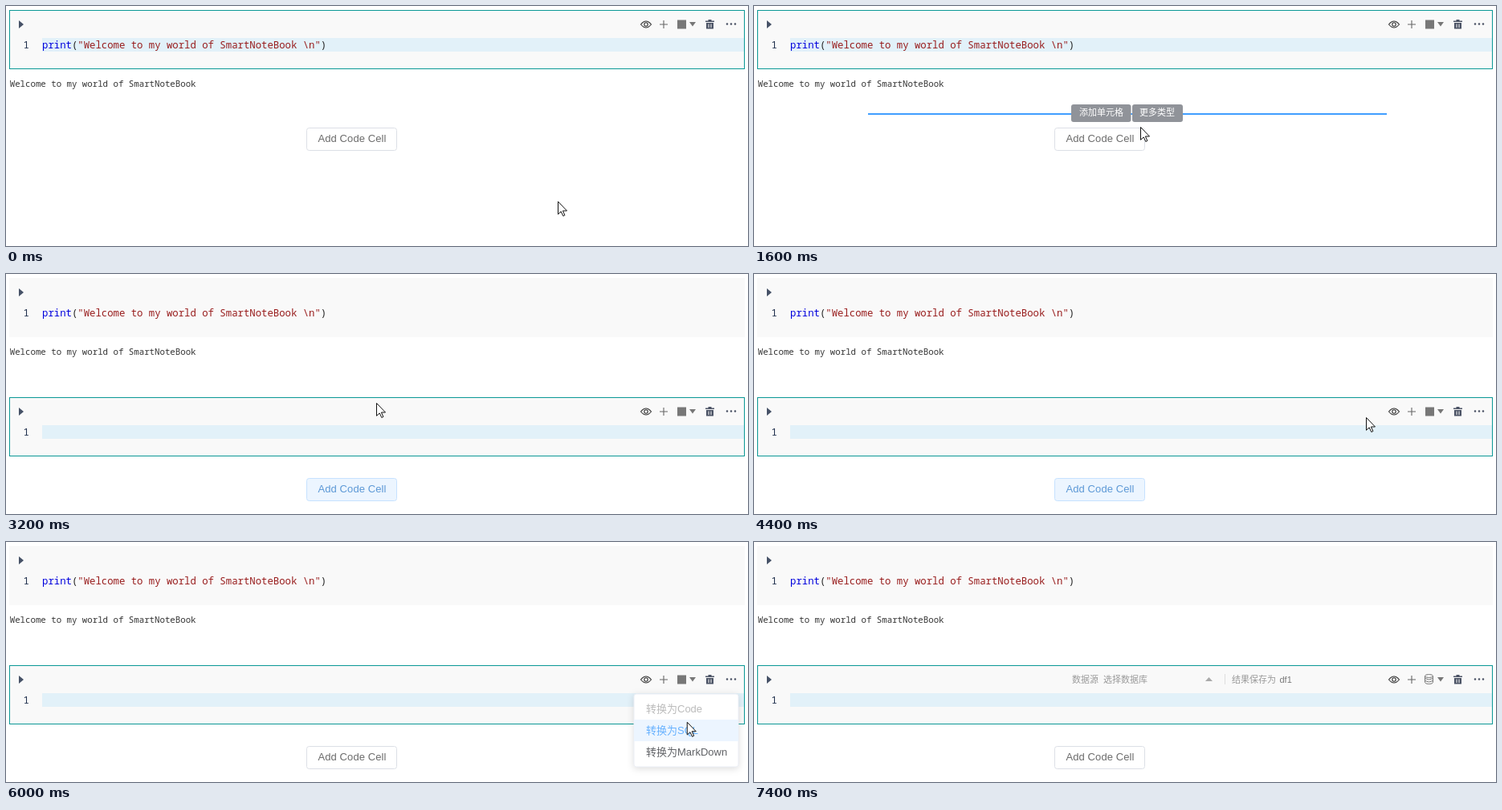
An HTML page for the animation above (8.2 s loop, 924 px wide and 300 px high).

```html
<!DOCTYPE html>
<html lang="zh">
<head>
<meta charset="utf-8">
<title>Notebook cells</title>
<style>
  html, body { margin: 0; width: 100%; height: 100%; overflow: hidden; background: #fff; }
  svg { display: block; width: 924px; height: 300px; }
  text { white-space: pre; }
  .code { font: 12.3px "Noto Sans Mono", monospace; fill: #222; }
  .out { font: 10.74px "Noto Sans Mono", monospace; fill: #333; }
  .word { fill: #00d; }
  .str { fill: #981c1c; }
  .num { fill: #1f2f4c; }
  .ui { font: 11px "Liberation Sans", "Noto Sans CJK SC", "Noto Sans CJK", sans-serif; fill: #999; }
  .light { fill: #fff; font-weight: 500; }
  .item { font-size: 13px; fill: #606266; }
  .item.off { fill: #bbb; }
  .item.hover { fill: #66b1ff; }
  .cell { fill: #f9f9f9; }
  .play { fill: #465267; }
  #add rect { fill: #fff; stroke: #dcdfe6; }
  #add text { font: 13px "Liberation Sans", Arial, sans-serif; letter-spacing: .1px; fill: #6b6b6b; }
  #add.hover rect, #add.press rect { fill: #ecf5ff; stroke: #c6e2ff; }
  #add.press rect { stroke: #5a9fdc; }
  #add.hover text, #add.press text { fill: #5c98d6; }
  #type { color: #777; }
  #type.on { color: #1b95d3; }
  .dark { fill: #303133; }
  .panel { fill: #fff; stroke: #ebeef5; filter: drop-shadow(0 2px 4px #0002); }
</style>
</head>
<body>
<svg viewBox="0 0 924 300">
  <rect class="cell" x="4" y="5" width="916" height="74"/>
  <rect class="cell" id="cell2" x="4" y="154" width="916" height="74"/>

  <g id="active">
    <rect x="4.5" y="5.5" width="915" height="73" fill="none" stroke="#0a9896"/>
    <rect x="45" y="40" width="874" height="17" fill="#e2f1f9"/>
    <g fill="none" stroke="#333" stroke-width="1.1">
      <path d="M790.5 23Q797 15 803.5 23Q797 31 790.5 23Z"/>
      <circle cx="797" cy="23" r="2.2"/>
      <path d="M814 23H824M819 18V28" stroke="#666"/>
    </g>
    <g id="type">
      <rect id="lang" x="836" y="17.5" width="11" height="11" fill="currentColor"/>
      <g id="db" fill="none" stroke="currentColor">
        <ellipse cx="840.5" cy="18.5" rx="5" ry="2"/>
        <path d="M835.5 18.5V26.5Q836 28.5 840.5 28.5T845.5 26.5V18.5M835.5 21.5Q840.5 24.5 845.5 21.5M835.5 24.5Q840.5 27.5 845.5 24.5"/>
      </g>
      <path d="M851 20H859L855 25.5Z" fill="currentColor"/>
    </g>
    <g fill="#4b5365">
      <path d="M871 18.5H874.5V17H878.5V18.5H882V20H871ZM872 21H881V28.5H872Z"/>
      <path d="M875 22.5V27M878 22.5V27" stroke="#f9f9f9"/>
      <path d="M898 22.5h0m5 0h0m5 0h0" stroke="#4b5365" stroke-width="2.6" stroke-linecap="round"/>
    </g>
  </g>

  <path class="play" d="M16 18V28L22 23Z"/>
  <text class="code num" x="21.5" y="53">1</text>
  <text class="code" x="45" y="53"><tspan class="word">print</tspan>(<tspan class="str">"Welcome to my world of SmartNoteBook \n"</tspan>)</text>
  <text class="out" x="4.7" y="101">Welcome to my world of SmartNoteBook</text>

  <g id="label2" transform="translate(0 149)">
    <path class="play" d="M16 18V28L22 23Z"/>
    <text class="code num" x="21.5" y="53">1</text>
  </g>

  <g id="sql" class="ui">
    <text x="396" y="175.5">数据源</text>
    <text x="435" y="175.5">选择数据库</text>
    <path d="M562 174H571L566.5 169Z" fill="#aaa"/>
    <path d="M586.5 165V178" stroke="#ddd"/>
    <text x="595" y="175.5">结果保存为</text>
    <text id="result" x="654.5" y="175.5"></text>
  </g>

  <g id="add">
    <rect x="374.5" y="152.5" width="112" height="28" rx="3"/>
    <text x="431" y="170.3" text-anchor="middle">Add Code Cell</text>
  </g>

  <g id="insert" class="ui">
    <path d="M142 135H788" stroke="#409eff" stroke-width="2"/>
    <rect x="395" y="123" width="74.5" height="22" rx="3" fill="#909399"/>
    <rect x="471" y="123" width="63" height="22" rx="3" fill="#909399"/>
    <text class="light" x="405" y="136.5">添加单元格</text>
    <text class="light" x="480" y="136.5">更多类型</text>
  </g>

  <g id="tipAdd" class="ui">
    <path class="dark" d="M814 190L819 184.5L824 190Z"/>
    <rect class="dark" x="765" y="189.5" width="108" height="28" rx="4"/>
    <text class="light" x="775.5" y="207.5">在下方插入单元格</text>
  </g>
  <g id="menu" class="ui">
    <rect class="panel" width="130" height="91" rx="3"/>
    <rect id="shade" y="32" width="130" height="27" fill="#ecf5ff"/>
    <text class="item" id="toCode" x="15" y="23.2">转换为Code</text>
    <text class="item" id="toSql" x="15" y="50.2">转换为SQL</text>
    <text class="item" x="15" y="77.2">转换为MarkDown</text>
  </g>
  <g id="tipType" class="ui">
    <path class="dark" d="M842 153L847.5 159L853 153Z"/>
    <rect class="dark" x="799" y="125" width="97" height="28.5" rx="4"/>
    <text class="light" x="809.5" y="143.5">转换单元格类型</text>
  </g>

  <g id="cursor">
    <circle id="click" r="16" fill="#f4e410"/>
    <path d="M.5 .5V16.3L4.2 12.9L6.8 18.5L8.9 17.5L6.4 12H11.5Z" fill="#fff" stroke="#111"/>
  </g>
</svg>
<script>
  const LOOP = 8200, STEP = 200;
  const el = {};
  document.querySelectorAll('[id]').forEach(n => el[n.id] = n);

  // Turning points of the pointer: time, x, y
  const path = [
    [0, 687, 244], [200, 779, 190], [600, 478, 160], [1000, 492, 57],
    [1600, 481, 151], [2000, 461, 161], [4200, 461, 161], [4400, 762, 179],
    [5200, 859, 188], [5400, 859, 188], [6200, 844, 237], [6600, 844, 237],
    [7400, 924, 234]
  ];

  const within = (t, from, to) => t >= from && t < to;
  // Rises from 0 to 1 after `from` and falls back to 0 before `to`
  const pulse = (t, from, to, ramp = 400) =>
    Math.max(0, Math.min(1, (t - from) / ramp, (to - t) / ramp));
  const show = (node, on) => node.style.display = on ? '' : 'none';
  const fade = (node, amount) => node.style.opacity = amount;
  const style = (node, name) => node.setAttribute('class', name);
  const move = (node, x, y, extra = '') =>
    node.setAttribute('transform', `translate(${x} ${y})${extra}`);

  function pointer(t) {
    const i = Math.max(1, path.findIndex(p => p[0] >= t));
    const [t0, x0, y0] = path[i - 1], [t1, x1, y1] = path[i];
    const k = (t - t0) / (t1 - t0);
    return [x0 + (x1 - x0) * k, y0 + (y1 - y0) * k];
  }

  function draw(t) {
    const added = t >= 3200, sql = t >= 6600, named = t >= 7000;
    const picking = within(t, 6000, 6600);
    const pressed = within(t, 2800, 3200);
    const hovered = t === 600 || within(t, 1800, 5200);

    show(el.cell2, added);
    show(el.label2, added);
    move(el.active, 0, added ? 149 : 0);
    move(el.add, 0, added ? 103 : 0);
    move(el.insert, 0, added ? 103 : 0);
    style(el.add, pressed ? 'press' : hovered ? 'hover' : '');

    show(el.sql, sql);
    show(el.db, sql);
    show(el.lang, !sql);
    style(el.type, within(t, 5000, 5800) ? 'on' : '');
    el.result.textContent = named ? 'df1' : '变量名';
    el.result.style.fill = named ? '#777' : '';

    fade(el.insert, pulse(t, 1200, 2000) + pulse(t, 6600, 7400));
    fade(el.tipAdd, pulse(t, 4600, 5400));
    fade(el.tipType, pulse(t, 4800, 5800));

    const open = pulse(t, 5008, 6728, 300);
    move(el.menu, 782, 190, ` scale(1 ${open})`);
    fade(el.menu, open);
    show(el.shade, picking);
    style(el.toCode, sql ? 'item' : 'item off');
    style(el.toSql, sql ? 'item off' : picking ? 'item hover' : 'item');

    show(el.cursor, t < 7400);
    if (t < 7400) move(el.cursor, ...pointer(t));
    show(el.click, t === 5200 || t === 6400);
  }

  const start = performance.now();
  function tick() {
    const t = (performance.now() - start) % LOOP;
    draw(Math.floor(t / STEP) * STEP);
    requestAnimationFrame(tick);
  }
  tick();
</script>
</body>
</html>
```
